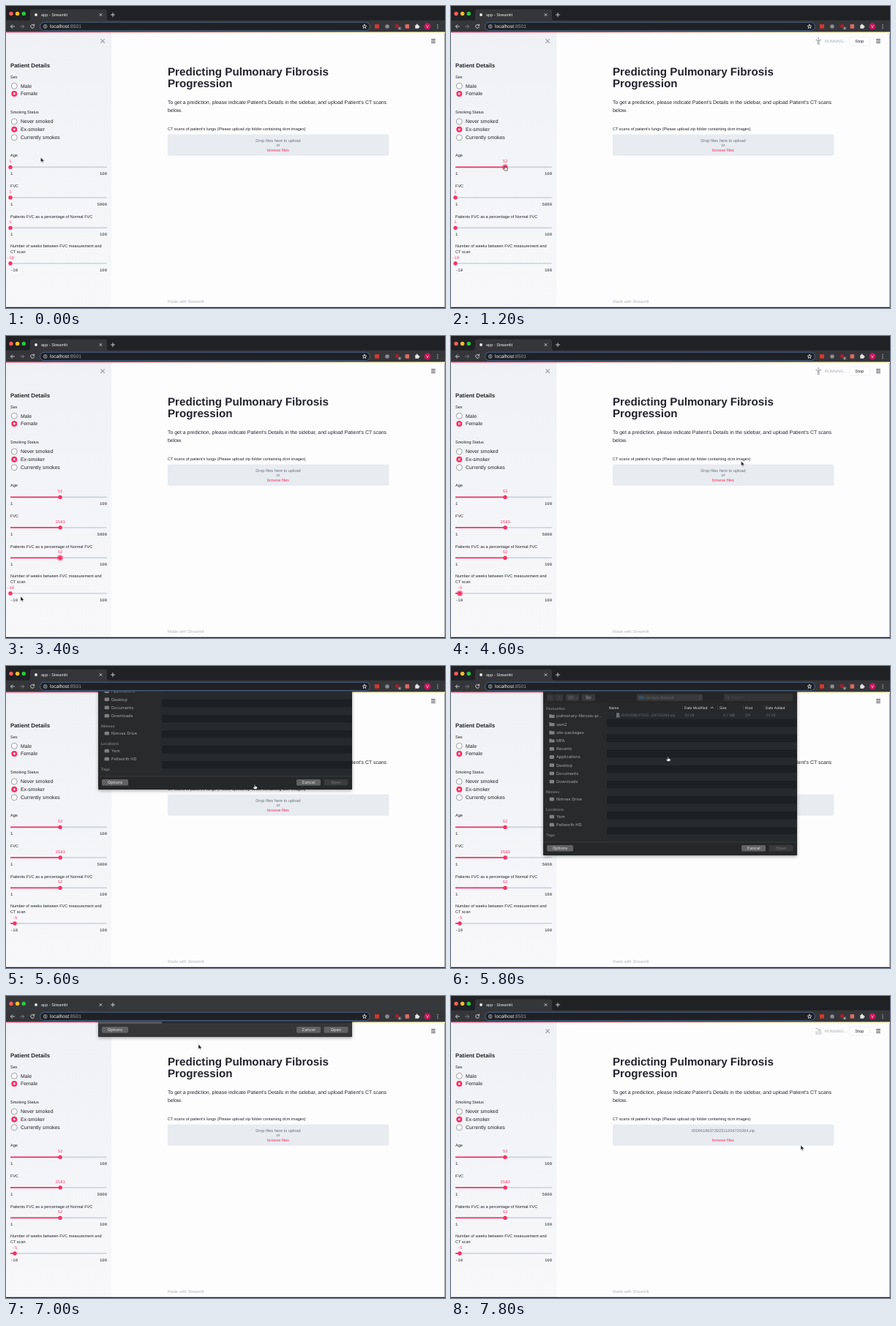
Write an HTML page that moves like this. It is 600x413 px and loops after 8000 ms.

```html
<!DOCTYPE html>
<html lang="en">
<head>
<meta charset="utf-8">
<title>Fibrosis app demo</title>
<style>
html, body { margin: 0; width: 100%; height: 100%; overflow: hidden; background: #fff; }
svg { display: block; width: 100%; height: 100%; }
text { font-family: "Liberation Sans", sans-serif; fill: #22232b; text-rendering: geometricPrecision; white-space: pre; }
.mono { font-family: "Liberation Mono", monospace; }
.ui { font-family: Inter, sans-serif; fill: #e4e4e5; }
.b { font-weight: 700; }
.red { fill: #f63366; }
.mid { text-anchor: middle; }
.end { text-anchor: end; }
.line { fill: none; stroke: #d5d6d9; stroke-width: .9; stroke-linecap: round; stroke-linejoin: round; }
</style>
</head>
<body>
<svg id="stage" viewBox="0 0 600 413" preserveAspectRatio="none"></svg>
<script>
const LOOP = 8000;
const RED = '#f63366';
const TOP = 35.4; // where the page begins under the toolbar
let css = '';

// Stepped keyframes: list of [ms, declarations]
function steps(id, frames) {
  const body = frames.map(([ms, rule]) => `${ms / LOOP * 100}%{${rule}}`).join('');
  css += `@keyframes k-${id}{${body}}#${id}{animation:k-${id} ${LOOP}ms step-end infinite}`;
}
const fade = (id, frames) => steps(id, frames.map(([ms, o]) => [ms, `opacity:${o}`]));
const tint = (id, frames) => steps(id, frames.map(([ms, color]) => [ms, `fill:${color}`]));
// Hidden at 0, then toggled at each edge
const toggle = (id, ...edges) => fade(id, [[0, 0], ...edges.map((ms, i) => [ms, (i + 1) % 2])]);

const text = (x, y, size, str, cls = '', attrs = '') =>
  `<text x="${x}" y="${y}" font-size="${size}" class="${cls}" ${attrs}>${str}</text>`;
const rect = (x, y, w, h, fill, r = 0, attrs = '') =>
  `<rect x="${x}" y="${y}" width="${w}" height="${h}" rx="${r}" fill="${fill}" ${attrs}/>`;
const dot = (x, y, r, fill, attrs = '') => `<circle cx="${x}" cy="${y}" r="${r}" fill="${fill}" ${attrs}/>`;
const line = (d, attrs = '') => `<path class="line" d="${d}" ${attrs}/>`;
const group = (id, ...parts) => `<g id="${id}">${parts.join('')}</g>`;

function browser() {
  return rect(0, 0, 600, 20, '#202124', 0, 'id="strip"') +
    dot(7, 10.5, 2.7, '#fe5f57') + dot(15.6, 10.5, 2.7, '#febc2e') + dot(24.3, 10.5, 2.7, '#28c840') +
    '<path d="M30 20q3 0 3-3V7.5q0-3 3-3h99q3 0 3 3V17q0 3 3 3z" fill="#35363a"/>' +
    rect(0, 19.6, 600, TOP - 19.6, '#35363a') +
    dot(41, 12, 1.9, '#f1f1f1') + text(48, 14, 5.55, 'app - Streamlit', '', 'style="fill:#eceded"') +
    line('M128 10.5l3 3m0-3l-3 3M143.5 12h5m-2.5-2.5v5') +
    line('M11.5 28h-5m2.2-2.3L6.4 28l2.3 2.3') +
    line('M19.5 28h5m-2.2-2.3l2.3 2.3-2.3 2.3', 'opacity=".45"') +
    line('M38.3 26.4a2.5 2.5 0 1 0 .3 2.2M38.6 25v1.8h-1.8') +
    rect(47, 22.5, 450, 10.8, '#202124', 5.4) +
    rect(46.6, 22.2, 450.8, 11.4, 'none', 5.7, 'stroke="#4d6f9f" stroke-width=".8"') +
    dot(53.7, 28, 2.4, 'none', 'stroke="#c8c9cc" stroke-width=".7"') + line('M53.7 27.8v1.3M53.7 26.6v.05', 'stroke-width=".7"') +
    text(60, 30.1, 6.65, 'localhost<tspan fill="#9aa0a6">:8501</tspan>', '', 'style="fill:#f0f0f1"') +
    line('M490 25.2l.8 1.9 2 .1-1.6 1.3.6 2-1.8-1.1-1.8 1.1.6-2-1.6-1.3 2-.1z', 'stroke-width=".6"') +
    rect(504, 25, 6, 5.8, '#d3372f', 1) + dot(521, 28, 2.8, '#8b8c90') + dot(534.5, 27.5, 2.8, '#a51d2b') +
    rect(535.5, 28.2, 5, 4.4, '#55565b', 1) + text(538, 31.9, 4, '6', 'mid', 'style="fill:#fff"') +
    rect(545.5, 25, 5.6, 5.8, '#dc6a62', 1) +
    rect(559.3, 26, 4.8, 4.8, '#e3e4e6', .6) + dot(561.7, 25.7, 1.1, '#e3e4e6') + dot(564.4, 28.4, 1.1, '#e3e4e6') +
    dot(576, 27.8, 4.5, '#c2185b') + text(576, 29.9, 5.5, 'V', 'mid', 'style="fill:#fff"') +
    [25.6, 27.9, 30.2].map(y => dot(590, y, .65, '#d5d6d9')).join('');
}

const radio = (y, label, on) =>
  dot(11.3, y, 4, on ? RED : '#fdfdfe', on ? '' : 'stroke="#8a8c94" stroke-width=".8"') +
  (on ? dot(11.3, y, 1.4, '#fff') : '') + text(20, y + 2.4, 6.92, label);

function slider(id, y, min, max, value, at, blurAt) {
  const end = 6 + 132 * (value - min) / (max - min);
  const thumb = (x, val) => rect(6, y - .85, x - 6, 1.7, RED) + dot(x, y, 2.7, RED) +
    text(x, y - 6.1, 5.6, val, 'mono mid red');
  fade(id + 'Low', [[0, 1], [at, 0]]);
  toggle(id + 'High', at);
  toggle(id + 'Ring', at, blurAt);
  return rect(6, y - .85, 132, 1.7, '#cbd1dc', .8) +
    text(6, y + 10.6, 5.6, min, 'mono') + text(138, y + 10.6, 5.6, max, 'mono end') +
    group(id + 'Low', thumb(6, min)) + group(id + 'High', thumb(end, value)) +
    dot(end, y, 3.3, 'none', `id="${id}Ring" stroke="${RED}" stroke-opacity=".55" stroke-width="1.5"`);
}

function sidebar() {
  return rect(0, TOP, 144.3, 413 - TOP, 'url(#side)') +
    group('close', line('M129.8 45.6l4.6 4.6m0-4.6l-4.6 4.6', 'style="stroke:#a3a6ad;stroke-width:1.3"')) +
    text(6, 84, 7.85, 'Patient Details', 'b') +
    text(6, 98.6, 5.55, 'Sex') + radio(109.3, 'Male') + radio(120, 'Female', true) +
    text(6, 147.2, 5.55, 'Smoking Status') +
    radio(158, 'Never smoked') + radio(168.8, 'Ex-smoker', true) + radio(179.8, 'Currently smokes') +
    text(6, 206.4, 5.55, 'Age') + slider('age', 220.4, 1, 100, 52, 600, 2000) +
    text(6, 248, 5.55, 'FVC') + slider('fvc', 262, 1, 5000, 2583, 2000, 2600) +
    text(6, 289.6, 5.55, 'Patients FVC as a percentage of Normal FVC') + slider('pct', 303.4, 1, 100, 52, 2600, 3800) +
    text(6, 329.6, 5.55, 'Number of weeks between FVC measurement and') + text(6, 338.2, 5.55, 'CT scan') +
    slider('weeks', 352, -10, 100, -5, 3800, 5000);
}

function page() {
  const grey = 'style="fill:#6f737f"';
  return rect(0, TOP, 600, 413 - TOP, '#fefdfe') + sidebar() +
    rect(0, TOP, 600, 1, 'url(#deco)') +
    line('M581.2 45.6h5.6m-5.6 2.3h5.6m-5.6 2.3h5.6', 'style="stroke:#262730;stroke-linecap:butt"') +
    text(221, 95, 15.17, 'Predicting Pulmonary Fibrosis', 'b') + text(221, 110.6, 15.17, 'Progression', 'b') +
    text(221, 134.4, 6.95, "To get a prediction, please indicate Patient's Details in the sidebar, and upload Patient's CT scans") +
    text(221, 145.4, 6.95, 'below.') +
    text(221, 170, 5.54, "CT scans of patient's lungs (Please upload zip folder containing dcm images)") +
    rect(221, 175.5, 302.3, 29.2, '#e8ebf0', 1.6) +
    group('prompt', text(372, 185.7, 5.65, 'Drop files here to upload', 'mid', grey), text(372, 192, 5.65, 'or', 'mid', grey)) +
    group('picked', text(372, 185.7, 5.65, 'ID00419637202311204720264.zip', 'mid', grey)) +
    text(372, 198.6, 5.65, 'browse files', 'mid red') +
    text(221, 406.3, 5.65, 'Made with Streamlit', '', 'style="fill:#b3b6be"') +
    group('running',
      group('person', dot(502.3, 44.2, 1.1, '#a6a9b1'),
        line('M498.8 46.4l2.6.5h1.8l2.6-.5M501.5 47v5.4m1.6-5.4v5.4m-1.6-3h1.6', 'style="stroke:#a6a9b1;stroke-width:1.1"')),
      group('swimmer', dot(504.4, 46.5, 1.1, '#a6a9b1'),
        line('M498.6 44.4l2.6.2 2.4 3.4M498.4 49.4q1 1 2 0t2 0 2 0 2 0M498.4 51.8q1 1 2 0t2 0 2 0 2 0', 'style="stroke:#a6a9b1"')),
      text(511, 50, 5.45, 'RUNNING...', '', 'style="fill:#a6a9b1"'),
      rect(544.4, 42.2, 27.6, 11.8, '#fff', 1.6, 'stroke="#e9eaee" stroke-width=".7"'),
      text(558.2, 50, 5.7, 'Stop', 'mid')) +
    rect(0, 411.8, 600, 1.2, '#1c1c1e') + rect(599.5, 37, .5, 376, '#555');
}

const folder = (x, y, fill = '#a9aaac') =>
  `<path d="M${x} ${y - 2.4}h2.6l.8.8h3.8v4.2h-7.2z" fill="${fill}"/>`;

const button = (x, w, label, id) =>
  rect(x, 245, w, 8.4, '#626264', 1.6, id ? `id="${id}"` : '') + text(x + w / 2, 251.2, 5.5, label, 'ui mid', id ? 'id="openLabel"' : '');

function dialog() {
  const places = ['pulmonary-fibrosis-pr…', 'sem2', 'site-packages', 'MFA', 'Recents', 'Applications', 'Desktop', 'Documents', 'Downloads'];
  const head = (y, label) => text(130, y + 1.8, 5, label, 'ui b', 'opacity=".62"');
  const item = (y, label, isFolder) => text(144, y + 2, 5.6, label, 'ui') +
    (isFolder ? folder(134.3, y) : rect(134.6, y - 2.3, 6.4, 4.8, '#a9aaac', 1.3));
  const cells = (y, size, ...labels) => [233, 319, 372, 402, 430].map((x, i) => text(x, y, size, labels[i], 'ui')).join('');
  const stripes = Array.from({ length: 17 }, (_, i) => rect(213, 62.2 + i * 10.52, 260, 10.52, i % 2 ? '#1c2022' : '#262a2d')).join('');
  return `<g clip-path="url(#below)"><g id="sheet">` +
    group('frame',
      rect(126, 30, 347, 229, 'inherit', 1.5, 'style="fill:inherit" filter="url(#shadow)"')) +
    group('tools',
      rect(131, 38.5, 10.6, 9.2, '#5c5c5f', 1.6), rect(142.4, 38.5, 10.8, 9.2, '#5c5c5f', 1.6),
      line('M137 41.2l-1.8 1.9 1.8 1.9M147 41.2l1.8 1.9-1.8 1.9', 'opacity=".6"'),
      rect(157, 38.5, 18, 9.2, '#68686b', 1.6), line('M160.5 41.4h7m-7 1.8h7m-7 1.8h7m3-2l1 1 1-1'),
      rect(178.5, 38.5, 18.5, 9.2, '#68686b', 1.6), folder(184.2, 43, '#e4e4e5'),
      rect(254, 38.5, 90, 9.2, '#68686b', 1.6), folder(257, 43, '#58b5e8'), text(266, 45, 5.45, 'sample dataset', 'ui'),
      line('M339 42.2l1.4-1.5 1.4 1.5m-2.8 1.8l1.4 1.5 1.4-1.5', 'stroke-width=".7"'),
      rect(373, 38.5, 94, 9.2, '#525255', 1.6, 'stroke="#6a6a6c" stroke-width=".5"'),
      dot(378, 42.6, 1.5, 'none', 'stroke="#bbb" stroke-width=".7"'), line('M379.2 43.8l1.2 1.2'),
      text(383, 45, 5.4, 'Search', 'ui', 'opacity=".55"')) +
    rect(126, 50.5, 87, 190.5, '#58585a', 0, 'id="places"') +
    group('placeNames', head(58, 'Favourites'),
      places.map((name, i) => item(68.4 + i * 11.2, name, i < 4)).join(''),
      head(172, 'Nimvex'), item(182, 'Nimvex Drive'), head(196, 'Locations'),
      item(206, 'Yem'), item(217, 'Pellworth HD'), head(231, 'Tags')) +
    rect(213, 50.5, 260, 12, '#26282a') +
    [[216, 'Name'], [319, 'Date Modified'], [367, 'Size'], [402, 'Kind'], [430, 'Date Added']]
      .map(([x, label]) => text(x, 58.8, 4.75, label, 'ui')).join('') +
    line('M355.5 57.6l1.4-1.4 1.4 1.4', 'stroke-width=".6"') +
    [316.5, 364.5, 399, 427].map(x => rect(x, 53.5, .4, 6, '#555')).join('') +
    stripes + rect(213, 62.2, 260, 10.5, '#0a55d4', 0, 'id="selected"') +
    group('file', '<path d="M226 64h3l1.5 1.5v5H226z" fill="#ededee"/>',
      cells(69.3, 4.9, 'ID00419637202…04720264.zip', '20:08', '8.7 MB', 'ZIP', '20:08')) +
    rect(126, 241, 347, 18, '#353537', 1.5, 'id="footer"') + rect(126, 240.7, 347, .5, '#4a4a4c') +
    button(131, 36, 'Options') + button(397, 33, 'Cancel') + button(434.5, 33, 'Open', 'open') +
    '</g></g>';
}

function cursor() {
  return group('cursor',
    group('arrow', '<path d="M0 0V6.6L1.6 5.2 2.6 7.5 3.7 7 2.7 4.9H4.7Z" fill="#111" stroke="#fff" stroke-width=".5"/>'),
    group('hand', '<path d="M-.7.6Q0-.4.7.6V2.4L2.8 2.9Q3.5 3.2 3.4 4L2.8 6.6H-.5L-2.4 4.2Q-2 3.1-.7 3.9Z" fill="#fff" stroke="#222" stroke-width=".7"/>'));
}

const path = [
  [0, 47.5, 207], [200, 62, 213], [400, 74, 218.5], [1400, 74, 232], [1600, 74, 249], [1800, 74, 260],
  [2200, 74, 279], [2400, 74.5, 302], [3000, 66, 318], [3200, 42, 339], [3400, 20, 356], [3600, 14, 358],
  [3800, 12, 351], [4200, 70, 322], [4400, 262, 230], [4600, 396.5, 171], [4800, 384, 187], [5000, 372, 194],
  [5600, 340, 162], [5800, 296.5, 124], [6000, 286, 104], [6200, 270, 78], [6400, 263, 66],
  [7200, 300, 98], [7400, 390, 160], [7600, 455, 196], [7800, 478, 204]
];
steps('cursor', path.map(([ms, x, y]) => [ms, `transform:translate(${x}px,${y}px)`]));
const handEdges = [400, 1400, 1800, 2200, 2400, 3000, 3600, 4200, 5000, 6200];
toggle('hand', ...handEdges);
fade('arrow', [[0, 1], ...handEdges.map((ms, i) => [ms, i % 2])]);

fade('running', [[0, 0], [800, .3], [1000, 1], [1400, .4], [1600, 0], [2400, .06], [2600, 1], [3000, .4], [3200, 0],
  [4000, .1], [4200, 1], [5000, 0], [7400, .3], [7600, 1]]);
fade('person', [[0, 1], [7400, 0]]);
toggle('swimmer', 7400);
fade('prompt', [[0, 1], [7400, 0]]);
toggle('picked', 7400);

// The sheet drops in dimmed; once it takes focus it lights up and the window behind goes inactive
const FOCUS = 6000;
fade('close', [[0, 1], [5400, 0], [7400, 1]]);
tint('strip', [[0, '#202124'], [FOCUS, '#37383b'], [7400, '#202124']]);
steps('sheet', [[0, -300], [5600, -90], [5800, 0], [7000, -203], [7200, -300]]
  .map(([ms, y]) => [ms, `transform:translateY(${y}px)`]));
tint('frame', [[0, '#252627'], [FOCUS, '#3b3b3d']]);
tint('footer', [[0, '#262728'], [FOCUS, '#363638']]);
tint('places', [[0, '#292a2b'], [FOCUS, '#58585a']]);
fade('tools', [[0, .3], [FOCUS, 1]]);
fade('placeNames', [[0, .68], [FOCUS, 1]]);
fade('file', [[0, .35], [FOCUS, .85], [6400, 1]]);
toggle('selected', 6400);
tint('open', [[0, '#3a3a3c'], [6400, '#1560de'], [7000, '#626264']]);
fade('openLabel', [[0, .35], [6400, 1]]);

document.getElementById('stage').innerHTML = `<defs>
  <linearGradient id="side" x2="0" y2="1"><stop stop-color="#eff1f5"/><stop offset="1" stop-color="#f8f8fa"/></linearGradient>
  <linearGradient id="deco"><stop stop-color="${RED}"/><stop offset="1" stop-color="#fffd80"/></linearGradient>
  <clipPath id="below"><rect y="${TOP}" width="600" height="377"/></clipPath>
  <filter id="shadow" x="-10%" y="-10%" width="120%" height="125%"><feDropShadow dx="0" dy="1.5" stdDeviation="2" flood-opacity=".35"/></filter>
</defs>` + page() + browser() + dialog() + cursor();
document.head.appendChild(document.createElement('style')).textContent = css;
</script>
</body>
</html>
```
